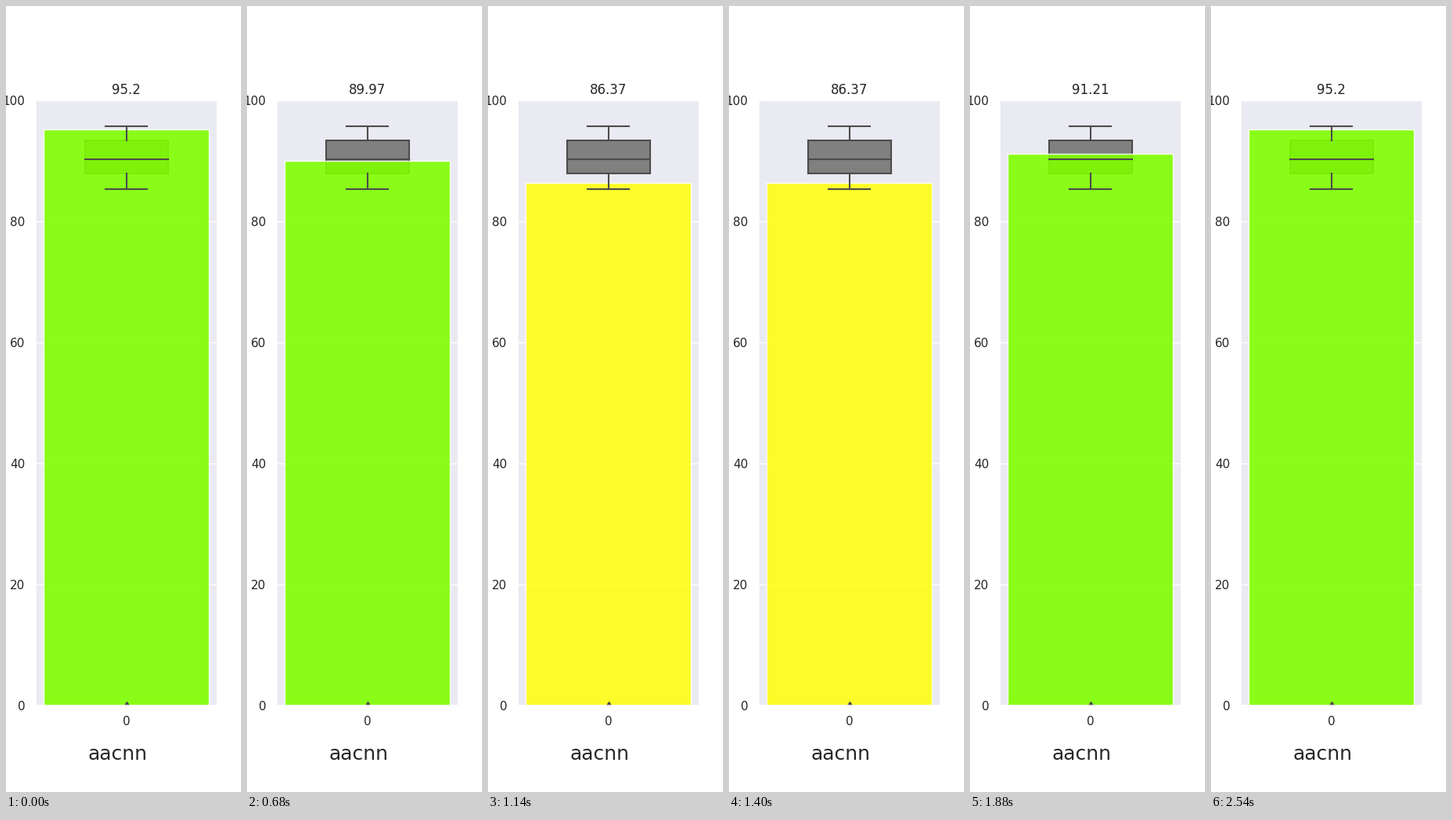
Write a matplotlib script that moves like this. It is 300 by 1000 pixels and loops after 2.56 s.

```python
import matplotlib.pyplot as plt
import numpy as np
from matplotlib.animation import FuncAnimation

INK = "0.15"
GRAY = "#4c4c4c"
LIMIT = 88  # scores below this turn the bar yellow
STEPS = 32

plt.rcParams.update({
    "font.family": "DejaVu Sans",
    "text.color": INK,
    "xtick.color": INK,
    "ytick.color": INK,
    "xtick.major.size": 6,
    "ytick.major.size": 6,
})


def score_at(step):
    """Score along the outward pass, straight between its turning points."""
    turns = {0: 95.2, 2: 95.72, 7: 94.08, 11: 89.9, 15: 92.2, 17: 91.21,
             18: 89.97, 22: 85.7, 27: 88.76, 29: 86.37, 31: 85.3}
    return np.interp(step, list(turns), list(turns.values()))


# Every fourth step is held for five ticks; the pass then plays backwards.
steps = np.arange(STEPS)
outward = np.repeat(score_at(steps), np.where(steps % 4 == 2, 5, 1))
timeline = np.concatenate([outward, outward[::-1]])

fig = plt.figure(figsize=(3, 10), dpi=100, facecolor="white")
ax = fig.add_axes([0.125, 0.11, 0.775, 0.77], facecolor="#eaeaf2")
ax.set_axisbelow(True)
ax.grid(axis="y", color="white", linewidth=1)
ax.tick_params(left=False, bottom=False, labelsize=11)
for spine in ax.spines.values():
    spine.set(edgecolor="white", linewidth=1.25)


def draw_box(low, q1, median, q3, high):
    ax.bar(0, q3 - q1, 0.4, bottom=q1, color="gray", edgecolor=GRAY,
           linewidth=1.5, zorder=0.9)
    line = dict(color=GRAY, linewidth=1.5, zorder=2)
    for start, end in ((low, q1), (q3, high)):
        ax.plot([0, 0], [start, end], **line)
    for half, level in ((0.1, low), (0.1, high), (0.2, median)):
        ax.plot([-half, half], [level, level], **line)
    ax.plot(0, 0, "d", color=GRAY, markersize=5, zorder=2)


draw_box(85.3, 87.95, 90.27, 93.4, 95.72)
bar = ax.bar(0, timeline[0], 0.8, edgecolor="white", linewidth=1,
             alpha=0.9, zorder=1)[0]
ax.set(xlim=(-0.44, 0.44), ylim=(0, 100), xticks=[0], yticks=range(0, 101, 20))
title = ax.set_title("", fontsize=12, pad=6)
fig.text(104 / 300, 1 - 959 / 1000, "aacnn", fontsize=18)


def update(frame):
    score = timeline[frame]
    bar.set_height(score)
    bar.set_facecolor("xkcd:yellow" if score < LIMIT else "chartreuse")
    title.set_text(str(round(float(score), 2)))
    return bar, title


anim = FuncAnimation(fig, update, frames=len(timeline), interval=20,
                     repeat=True, repeat_delay=0, blit=False)
plt.show()
```
